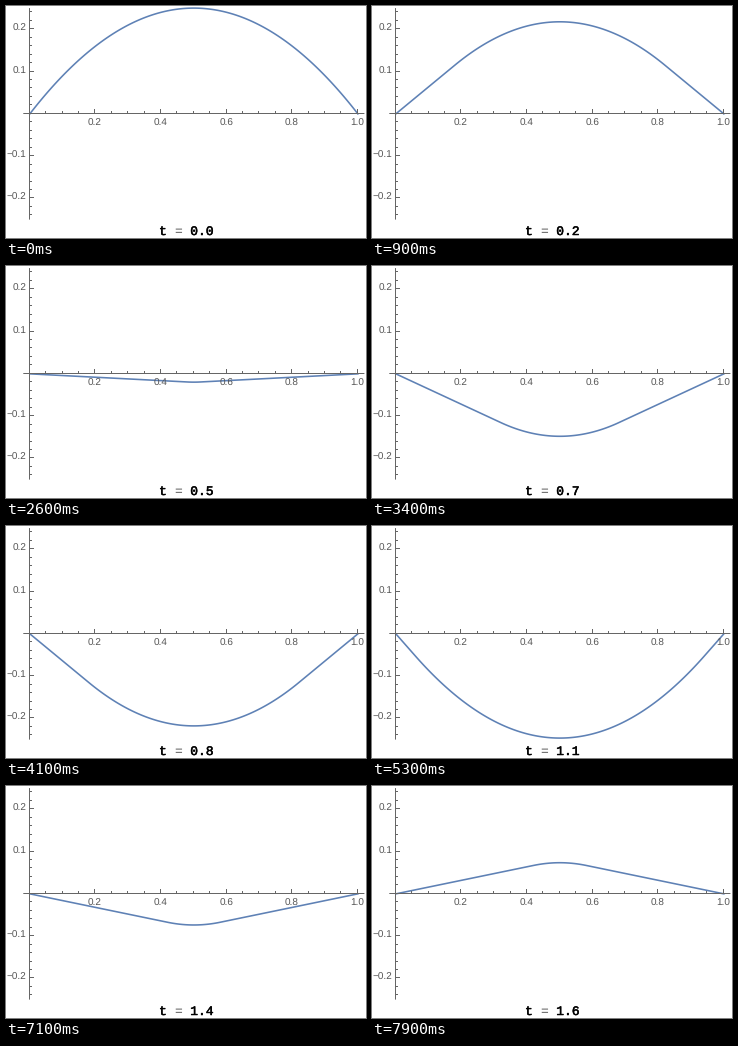
Write a matplotlib script that moves like this. It is 360x232 px and loops after 8 s.

```python
import numpy as np
import matplotlib.pyplot as plt
from matplotlib.animation import FuncAnimation
from matplotlib.patheffects import withStroke

W, H, DPI = 360, 232, 64
FRAMES, INTERVAL, DT = 80, 100, 0.02
X0, Y0, SX, SY = 23.85, 107.85, 328, 423
GRAY, BLUE = "#666666", "#5e81b5"
PT = 72 / DPI  # points per pixel

plt.rcParams["path.simplify"] = False
plt.rcParams["text.hinting"] = "no_hinting"
fig = plt.figure(figsize=(W / DPI, H / DPI), dpi=DPI, facecolor="white")
ax = fig.add_axes([0, 0, 1, 1])
ax.set_xlim(0, W)
ax.set_ylim(H, 0)
ax.axis("off")


def px(x):
    return X0 + SX * x


def py(y):
    return Y0 - SY * y


def crisp(v):
    """Centre of the pixel that a hairline at v falls on."""
    return np.floor(v - 0.5) + 0.5


def rule(xs, ys):
    ax.plot(xs, ys, color=GRAY, lw=PT, solid_capstyle="butt", snap=False, zorder=3)


def label(x, y, text, size=10, color="#555555", ha="center", font="Liberation Sans", **kw):
    return ax.text(x, y, text, fontsize=size * PT, color=color, ha=ha,
                   va="baseline", family=font, zorder=4, **kw)


def pluck(x):
    """Parabola x(1 - x), extended as an odd function of period 2."""
    s = np.mod(x, 2)
    return np.where(s < 1, s * (1 - s), (s - 1) * (s - 2))


def string_at(x, t):
    return (pluck(x + t) + pluck(x - t)) / 2


# axes
ox, oy = crisp(X0), crisp(Y0)
rule([px(-0.02), px(1.02)], [oy, oy])
rule([ox, ox], [py(0.25), py(-0.25)])

for i in range(1, 21):
    x, major = crisp(px(i / 20)), i % 4 == 0
    rule([x, x], [oy, oy - (4.5 if major else 2.5)])
    if major:
        label(x, 120, f"{i / 20:.1f}")

for i in range(-12, 13):
    if i == 0:
        continue
    y, major = crisp(py(i / 50)), i % 5 == 0
    rule([ox, ox + (4.5 if major else 2.5)], [y, y])
    if major:
        label(20.5, y + 2.8, f"{i / 50:.1f}".replace("-", "\u2212"), ha="right")

# moving string and time caption
xs = np.linspace(0, 1, 401)
curve, = ax.plot([], [], color=BLUE, lw=1.6 * PT, solid_joinstyle="round", zorder=2)
mono = dict(size=13, ha="left", font="Liberation Mono")
clock = label(153, 229, "", color="black", **mono,
              path_effects=[withStroke(linewidth=0.5 * PT, foreground="black")])
label(153 + 2 * 7.8, 229, "=", **mono)


def update(k):
    t = k * DT
    curve.set_data(px(xs), py(string_at(xs, t)))
    clock.set_text(f"t   {t:.1f}")
    return curve, clock


anim = FuncAnimation(fig, update, frames=FRAMES, interval=INTERVAL,
                     repeat=True, repeat_delay=0, blit=False)
plt.show()
```
